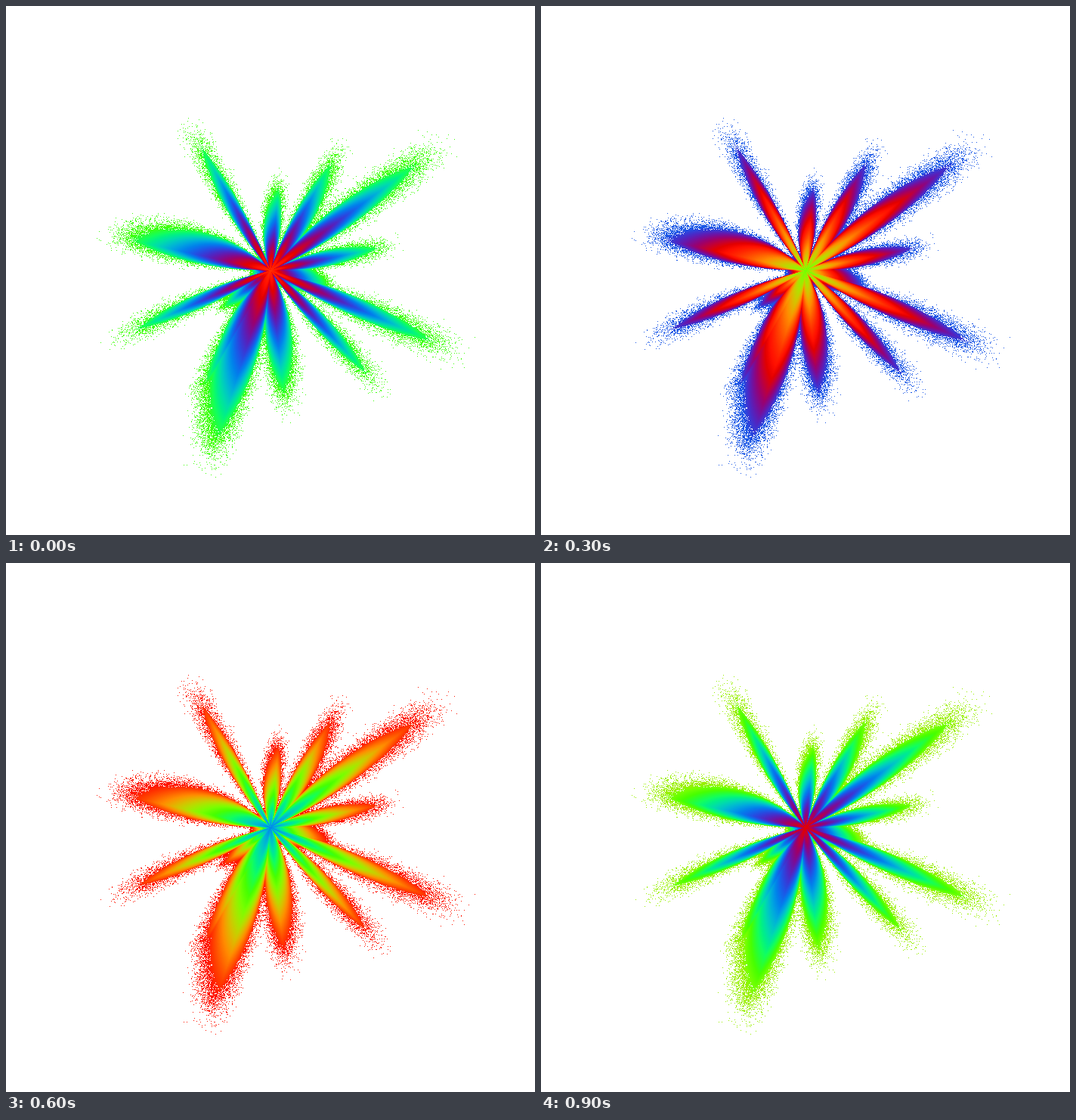
An HTML page with a canvas for the animation above (1000 ms loop, 700 px wide and 700 px high).

```html
<!DOCTYPE html>
<html lang="en">
<head>
<meta charset="utf-8">
<title>Colour burst</title>
<style>
  html, body { margin: 0; width: 100%; height: 100%; overflow: hidden; background: #fff; }
  canvas { display: block; width: 100%; height: 100%; image-rendering: pixelated; }
</style>
</head>
<body>
<canvas id="stage" width="700" height="700"></canvas>
<script>
const SIZE = 700, MID = SIZE / 2, STEP_MS = 100, STEPS = 10;
const CORE = 6.4;    // colour steps from the rim to the middle
const HUB = 25;      // least radius between arms
const BLUR = 2.2;    // angular scatter of the specks, in degrees
const ctx = document.getElementById('stage').getContext('2d');

// Arms clockwise from the right: angle, reach, spread before and after it
const arms = [
  [14, 78, 45, 45], [23.6, 240, 12, 10], [47, 192, 13, 9.5], [84, 166, 25, 20],
  [107.5, 235, 16, 33], [120, 176, 14, 15], [142, 80, 25, 25], [156.3, 200, 9.5, 11],
  [192.3, 192, 12.5, 34], [240.7, 194, 12.5, 8.5], [275.7, 112, 28, 15],
  [299.5, 167, 12, 20], [324, 244, 15, 12.5], [348.3, 150, 16, 14]
];

let seed = 20317;
function random() {
  seed = (seed + 0x6D2B79F5) | 0;
  let t = Math.imul(seed ^ (seed >>> 15), 1 | seed);
  t = (t + Math.imul(t ^ (t >>> 7), 61 | t)) ^ t;
  return ((t ^ (t >>> 14)) >>> 0) / 4294967296;
}

// Sum of three uniform numbers, close to a normal spread of 1
const scatter = () => (random() + random() + random() - 1.5) * 2;

function radiusAt(angle) {
  let radius = HUB;
  for (const [mid, reach, before, after] of arms) {
    const off = (angle - mid + 900) % 360 - 180;
    const share = Math.abs(off) / (off < 0 ? before : after);
    if (share < 1) radius = Math.max(radius, reach * (1 - share ** 1.2));
  }
  return radius;
}

// Chance that a speck lands at this share of the outline radius
function chance(share) {
  const d = share - 1;
  return d > 0.27 ? 0 : 1 - Math.exp(-2.4 * Math.exp(-12 * d - 40 * Math.max(0, d) * d));
}

const specks = [];
for (let y = 140; y < 630; y++) {
  for (let x = 112; x < 625; x++) {
    const dx = x + 0.5 - MID, dy = y + 0.5 - MID;
    const r = Math.hypot(dx, dy);
    const angle = Math.atan2(dy, dx) * 180 / Math.PI;
    const share = r / radiusAt(angle);
    if (share < 0.95 || random() < chance(r / radiusAt(angle + BLUR * scatter()))) {
      specks.push([y * SIZE + x, Math.max(0, CORE * (1 - share) + 0.1)]);
    }
  }
}

// Each channel is a clipped cosine around the colour wheel
function wave(at, base, swing, peak) {
  const value = base + swing * Math.cos((at - peak) / STEPS * 2 * Math.PI);
  return Math.round(Math.min(255, Math.max(0, value)));
}

function colour(at) {
  const r = wave(at, 130, 145, 6.75);
  const g = wave(at, 130, 135, 0);
  const b = wave(at, 30, 205, 2.65);
  return (255 << 24 | b << 16 | g << 8 | r) >>> 0;
}

const FINE = 32;
const ramp = Array.from({ length: STEPS * FINE }, (_, i) => colour(i / FINE));
const image = ctx.createImageData(SIZE, SIZE);
const pixels = new Uint32Array(image.data.buffer).fill(0xffffffff);

function draw(step) {
  for (const [at, level] of specks) {
    pixels[at] = ramp[Math.floor((level + step) * FINE) % ramp.length];
  }
  ctx.putImageData(image, 0, 0);
}

const start = performance.now();
let shown = -1;
function tick() {
  const step = Math.floor((performance.now() - start) / STEP_MS) % STEPS;
  if (step !== shown) draw(shown = step);
  requestAnimationFrame(tick);
}
tick();
</script>
</body>
</html>
```
